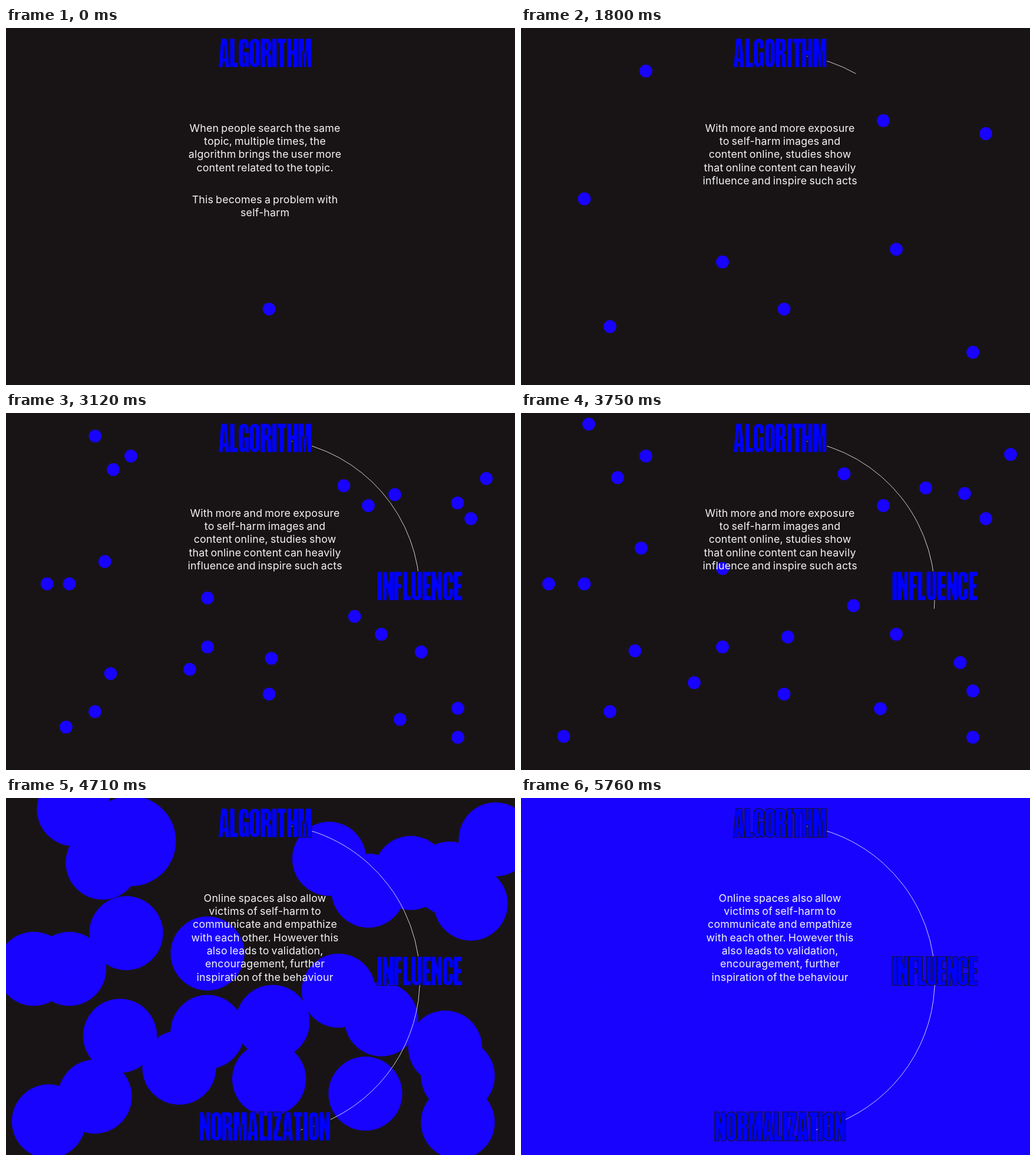
Recreate the animation shown at these times as an HTML page with a canvas. Size 864x605 px, loop 5.79 s.

```html
<!DOCTYPE html>
<html lang="en">
<head>
<meta charset="utf-8">
<title>Algorithm, influence, normalization</title>
<style>
  html, body { margin: 0; width: 864px; height: 605px; overflow: hidden; background: #181415; }
  canvas { display: block; }
</style>
</head>
<body>
<canvas id="stage" width="864" height="605"></canvas>
<script>
const ctx = document.getElementById('stage').getContext('2d');
const LOOP = 5790, DARK = '#181415', DOT = '#1803ff', CX = 439.6;

// Heavy condensed capitals, 49 units tall: [advance, outline]
const glyphs = {
  A: [19, 'M4.5 0h10l4.5 49h-8l-.6-9h-2.2l-.6 9h-7.6zM9.5 12l-1.2 21h2.4z'],
  C: [18, 'M9 0q9 0 9 11v8h-8v-9q0-3-1-3t-1 3v29q0 3 1 3t1-3v-10h8v9q0 11-9 11t-9-11v-27q0-11 9-11z'],
  E: [15, 'M0 0h15v8h-6.7v12.5h5.5v8h-5.5v12.5h6.7v8h-15z'],
  F: [14.5, 'M0 0h14.5v8h-6.2v12.5h5v8h-5v20.5h-8.3z'],
  G: [18, 'M9 0q9 0 9 11v6h-8v-7q0-3-1-3t-1 3v29q0 3 1 3t1-3v-9h-1.2v-7h9.2v26h-5l-.8-3q-2 3-5 3q-7.2 0-7.2-11v-27q0-11 9-11z'],
  H: [18.5, 'M0 0h8v20h2.5v-20h8v49h-8v-21h-2.5v21h-8z'],
  I: [8.5, 'M0 0h8.5v49h-8.5z'],
  L: [14, 'M0 0h8.2v41h5.8v8h-14z'],
  M: [23, 'M0 0h10l1.5 26l1.5-26h10v49h-7.5v-28l-2 28h-4l-2-28v28h-7.5z'],
  N: [18.5, 'M0 0h7l4 20v-20h7.5v49h-7l-4-21v21h-7.5z'],
  O: [18, 'M9 0q9 0 9 11v27q0 11-9 11t-9-11v-27q0-11 9-11zM9 7q-1 0-1 3v29q0 3 1 3t1-3v-29q0-3-1-3z'],
  R: [19, 'M0 0h10q8.5 0 8.5 10v6q0 6-4 8q4 2 4 7v13q0 3 .5 5h-8q-.5-2-.5-5v-12q0-4-2.2-4v21h-8.3zM8.3 7v13q2.2 0 2.2-4v-5q0-4-2.2-4z'],
  T: [15.5, 'M0 0h15.5v8h-3.6v41h-8.3v-41h-3.6z'],
  U: [18, 'M0 0h8v39q0 3 1 3t1-3v-39h8v38q0 11-9 11t-9-11z'],
  Z: [15, 'M0 0h15v8l-6.5 33h6.5v8h-15v-8l6.5-33h-6.5z']
};

function makeTitle(word) {
  const path = new Path2D();
  let x = 0;
  for (const c of word) {
    const [advance, outline] = glyphs[c];
    path.addPath(new Path2D(outline), new DOMMatrix([1, 0, 0, 1, x, 0]));
    x += advance + 0.6;
  }
  return { path, width: x - 0.6 };
}
const [algorithm, influence, normalization] =
  ['ALGORITHM', 'INFLUENCE', 'NORMALIZATION'].map(makeTitle);

// Each dot: x, y, then the places its copies move to
const dots = [
  [446.6, 476.3, [452.8, 379.5]],
  [212, 73, [164, 109.5], [115, 18.8]],
  [107.5, 289.5, [47, 289.5], [204, 229]],
  [342, 396.5, [342, 263.5], [294, 457]],
  [151, 506, [193.5, 403], [72.5, 548]],
  [637, 375, [564.5, 326.5], [745.5, 423]],
  [767, 549.5, [767, 471], [610, 501]],
  [615, 157, [548.5, 103], [687, 127]],
  [789, 179, [831, 70.2], [753, 136.5]]
];

const texts = [
  ['When people search the same', 'topic, multiple times, the',
   'algorithm brings the user more', 'content related to the topic.',
   '', 'This becomes a problem with', 'self-harm'],
  ['With more and more exposure', 'to self-harm images and',
   'content online, studies show', 'that online content can heavily',
   'influence and inspire such acts'],
  ['Online spaces also allow', 'victims of self-harm to',
   'communicate and empathize', 'with each other. However this',
   'also leads to validation,', 'encouragement, further',
   'inspiration of the behaviour']
];

function ease(t, from, to) {
  const u = Math.min(1, Math.max(0, (t - from) / (to - from)));
  return u * u * (3 - 2 * u);
}

function disc(x, y, r) {
  ctx.beginPath();
  ctx.arc(x, y, r, 0, 2 * Math.PI);
  ctx.fill();
}

function drawDots(t) {
  const appear = ease(t, 1020, 1380);
  const spread = ease(t, 2420, 3620);
  const flood = ease(t, 4400, 5400);
  ctx.fillStyle = DOT;
  dots.forEach(([x, y, ...copies], i) => {
    const r = 10.9 * (i ? appear : 1);
    disc(x, y, r + flood * (i === 1 ? 285 : 225));
    if (spread > 0)
      for (const [cx, cy] of copies)
        disc(x + (cx - x) * spread, y + (cy - y) * spread, r + flood * 225);
  });
}

function drawText(lines, alpha) {
  ctx.globalAlpha = alpha;
  ctx.fillStyle = '#f5f3f4';
  ctx.font = '17.8px Inter, "Noto Sans", sans-serif';
  ctx.letterSpacing = '0.2px';
  ctx.wordSpacing = '-1.2px';
  ctx.textAlign = 'center';
  let y = 175.8;
  for (const line of lines) {
    ctx.fillText(line, CX, y);
    y += line ? 22.3 : 31.5;
  }
  ctx.globalAlpha = 1;
}

function drawArc(t) {
  const end = -82 + 82 * ease(t, 1500, 2400) + 77 * ease(t, 3600, 4526);
  if (end <= -82) return;
  const rad = Math.PI / 180;
  ctx.beginPath();
  ctx.arc(439.5, 306.6, 263, -82 * rad, end * rad);
  ctx.strokeStyle = 'rgba(255,255,255,.8)';
  ctx.lineWidth = 1;
  ctx.stroke();
}

function drawTitle(title, cx, top, alpha) {
  ctx.save();
  ctx.globalAlpha = alpha;
  ctx.translate(cx - title.width / 2, top);
  ctx.fillStyle = '#0000ff';
  ctx.fill(title.path, 'evenodd');
  ctx.strokeStyle = DARK;
  ctx.lineWidth = 1.1;
  ctx.stroke(title.path);
  ctx.restore();
}

function draw(t) {
  ctx.fillStyle = DARK;
  ctx.fillRect(0, 0, 864, 605);
  drawDots(t);
  const second = ease(t, 1500, 1700), third = ease(t, 3750, 3950);
  drawText(texts[0], 1 - second);
  drawText(texts[1], second * (1 - third));
  drawText(texts[2], third);
  drawArc(t);
  drawTitle(algorithm, CX, 17.7, 1);
  drawTitle(influence, 702.4, 268.7, ease(t, 2155, 2575));
  drawTitle(normalization, CX, 532, ease(t, 4230, 4650));
}

const start = performance.now();
function tick() {
  draw((performance.now() - start) % LOOP);
  requestAnimationFrame(tick);
}
tick();
</script>
</body>
</html>
```
